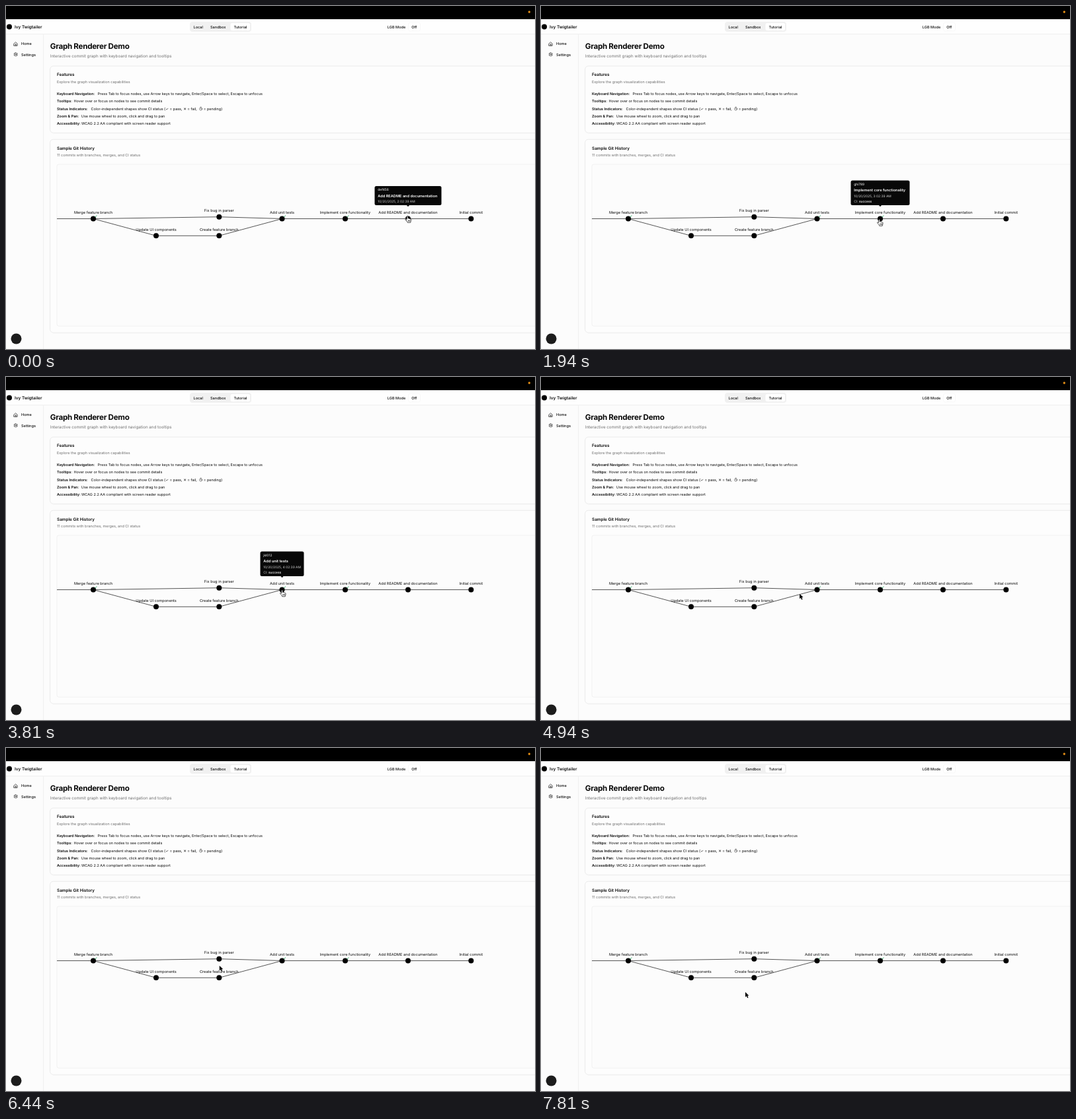
Write an HTML page that moves like this. It is 800 px wide and 520 px high and loops after 8000 ms.

```html
<!DOCTYPE html>
<html lang="en">
<head>
<meta charset="utf-8">
<title>Commit graph demo</title>
<style>
  html, body { margin: 0; width: 100%; height: 100%; overflow: hidden; background: #fcfcfc; }
  svg { display: block; width: 800px; height: 520px; }
  text { font-family: Inter, "DejaVu Sans", sans-serif; font-size: 5.5px; fill: #0a0a0a; text-rendering: geometricPrecision; white-space: pre; }
  .muted { fill: #6f6f6f; }
  .med { font-weight: 500; font-size: 5.58px; }
  .semi { font-weight: 600; }
  .label { font-size: 5.68px; text-anchor: middle; }
  .card { fill: #fdfdfd; stroke: #e6e6e6; stroke-width: .8; }
  .icon { fill: none; stroke: #222; stroke-width: .7; stroke-linejoin: round; stroke-linecap: round; }
  #tip text { fill: #fff; font-size: 4.9px; }
  #tip .head { font-size: 5.62px; font-weight: 600; }
  #tip .dim { fill: #d2d2d2; }
</style>
</head>
<body>
<svg viewBox="0 0 800 520">
  <rect width="800" height="520" fill="#fcfcfc"/>
  <rect y="20" width="800" height="22.5" fill="#fefefe"/>
  <rect width="800" height="20"/>
  <circle cx="791.3" cy="9" r="1.7" fill="#e08c16"/>
  <path d="M0 42.6H800M56.6 43V520" stroke="#ebebeb" stroke-width=".8"/>

  <circle cx="5" cy="31.5" r="4"/>
  <rect x="278" y="24" width="93" height="15" rx="4" fill="#f1f1f1"/>
  <rect x="339" y="25.4" width="30.5" height="12.3" rx="3" fill="#fff" stroke="#e6e6e6" stroke-width=".5"/>
  <rect x="608.5" y="25.2" width="18" height="12.8" rx="3" fill="#fff" stroke="#f3f3f3" stroke-width=".6"/>

  <g class="icon">
    <path d="M12 57L14.6 54.7L17.2 57V60.2H12ZM13.8 60.2V57.8H15.4V60.2"/>
    <circle cx="14.7" cy="73.4" r=".9"/>
    <path d="M14.7 70.5L15.6 71.4L17.2 71.9L16.8 73.4L17.2 74.9L15.6 75.4L14.7 76.3L13.8 75.4L12.2 74.9L12.6 73.4L12.2 71.9L13.8 71.4Z"/>
  </g>

  <rect class="card" x="66.6" y="91" width="760" height="101.3" rx="5"/>
  <rect class="card" x="66.6" y="202.2" width="760" height="293" rx="5"/>
  <path d="M71 193H800M71 495.9H800" stroke="#f2f2f2" stroke-width=".8"/>
  <rect x="77" y="240" width="760" height="245.3" rx="3" fill="#fcfcfc" stroke="#ececec" stroke-width=".7"/>

  <g id="copy"></g>
  <g class="icon" stroke="#333" style="stroke-width:.5">
    <circle cx="294.6" cy="156" r="2.1"/>
    <path d="M294.6 154.8V156L295.3 156.5M294 153.1H295.2"/>
  </g>

  <path d="M77 322.5H132L322.3 319.7L417.5 322.5H703.3M132 322.5L227 348.3H322.3L417.5 322.5" fill="none" stroke="#555" stroke-width="1"/>
  <g id="nodes"></g>
  <circle cx="15.5" cy="504.5" r="8" fill="#1c1c1c"/>
  <g id="tip"></g>
  <path id="arrow" d="M0 0V7.7L1.8 6L3.1 9L4.5 8.4L3.2 5.5L5.5 5.4Z" stroke="#fff" stroke-width=".6" paint-order="stroke"/>
  <path id="hand" d="M-.9 .8C-.9 -.3 .9 -.3 .9 .8V3.6C1.3 3 2.4 3.1 2.5 4C3 3.5 4 3.7 4.1 4.5C4.8 4.2 5.5 4.6 5.5 5.4L5.4 7C5.3 8.2 4.8 8.6 4.7 9.8H.2C0 8.6 -1 7.6 -2 6.3C-3 5 -3.2 4.5 -2.6 4.2C-2 3.9 -1.5 4.5 -.9 5.2ZM1.3 6.2V8.2M2.6 6.2V8.2M3.9 6.2V8.2" fill="#fff" stroke="#000" stroke-width=".7" stroke-linejoin="round"/>
</svg>
<script>
const LOOP = 8000;
const $ = id => document.getElementById(id);

function add(parent, tag, attrs, content) {
  const el = document.createElementNS('http://www.w3.org/2000/svg', tag);
  for (const k in attrs) el.setAttribute(k, attrs[k]);
  if (content) el.textContent = content;
  parent.appendChild(el);
  return el;
}

function write(parent, x, y, content, cls = '', style = '') {
  return add(parent, 'text', { x, y, class: cls, style }, content);
}

// Static page text
const copy = $('copy');
write(copy, 13, 33.8, 'Ivy Twigtailer', 'semi', 'font-size:6.4px');
[[283.5, 33.6, 'Local'], [309, 33.6, 'Sandbox'], [344.5, 33.6, 'Tutorial'],
 [576.8, 33.6, 'LGB Mode'], [613.2, 33.6, 'Off'],
 [23, 59.3, 'Home'], [23, 75.5, 'Settings']
].forEach(([x, y, s]) => write(copy, x, y, s, 'med'));
write(copy, 66.7, 65.1, 'Graph Renderer Demo', '', 'font-size:11.65px;font-weight:700;letter-spacing:-.025em');
write(copy, 66.8, 78.3, 'Interactive commit graph with keyboard navigation and tooltips', 'muted', 'font-size:6.2px');
write(copy, 77, 106.2, 'Features', 'semi', 'font-size:6.3px');
write(copy, 77, 116.6, 'Explore the graph visualization capabilities', 'muted');
write(copy, 77, 217.7, 'Sample Git History', 'semi', 'font-size:6.35px');
write(copy, 77, 228.1, '11 commits with branches, merges, and CI status', 'muted');
[['Keyboard Navigation:', 138.6, 'Press Tab to focus nodes, use Arrow keys to navigate, Enter/Space to select, Escape to unfocus'],
 ['Tooltips:', 102.4, 'Hover over or focus on nodes to see commit details'],
 ['Status Indicators:', 128.6, 'Color-independent shapes show CI status (✓ = pass, ✕ = fail,'],
 ['Zoom & Pan:', 113.8, 'Use mouse wheel to zoom, click and drag to pan'],
 ['Accessibility:', 113.9, 'WCAG 2.2 AA compliant with screen reader support']
].forEach(([head, x, body], i) => {
  const y = 134.6 + i * 11.45;
  write(copy, 77, y, head, 'semi');
  write(copy, x, y, body);
});
write(copy, 298.8, 157.5, '= pending)');

// Commit nodes: x, y, label, passed CI
[[132, 322.5, 'Merge feature branch', 1],
 [227, 348.3, 'Update UI components'],
 [322.3, 319.7, 'Fix bug in parser'],
 [322.3, 348.3, 'Create feature branch'],
 [417.5, 322.5, 'Add unit tests', 1],
 [513, 322.5, 'Implement core functionality', 1],
 [608, 322.5, 'Add README and documentation'],
 [703.3, 322.5, 'Initial commit']
].forEach(([x, y, name, passed]) => {
  add($('nodes'), 'circle', { cx: x, cy: y, r: 4 });
  if (passed) add($('nodes'), 'path', {
    d: `M${x + 2.2} ${y - 3.6}l1 1.1l2.1 -2.8`, fill: 'none', stroke: '#2fa866', 'stroke-width': .8
  });
  write($('nodes'), x, y - 7.5, name, 'label');
});

// Tooltips: visible from, until, node x, node y, box width, hash, title, hour, CI
const tips = [
  [0, 1190, 608, 322.5, 101, 'def456', 'Add README and documentation', 2],
  [1570, 3250, 513, 322.5, 89, 'ghi789', 'Implement core functionality', 3, 'success'],
  [3750, 4750, 417.5, 322.5, 66, 'jkl012', 'Add unit tests', 4, 'success'],
  [5380, 6250, 322.3, 319.7, 66, 'stu901', 'Fix bug in parser', 7],
  [6750, 7560, 322.3, 348.3, 71, 'mno345', 'Create feature branch', 5]
].map(([from, until, x, y, w, hash, title, hour, ci]) => {
  const g = add($('tip'), 'g', {});
  const h = ci ? 37.5 : 29;
  const left = x - w / 2, top = y - 20.5 - h, tx = left + 4.8;
  add(g, 'rect', { x: left, y: top, width: w, height: h, rx: 2.5, fill: '#080808' });
  add(g, 'path', { d: `M${x - 2.2} ${top + h - .2}h4.4l-2.2 2.4Z`, fill: '#080808' });
  write(g, tx, top + 7.4, hash);
  write(g, tx, top + 16.7, title, 'head');
  write(g, tx, top + 25.1, `10/20/2025, ${hour}:02:39 AM`, 'dim');
  if (ci) {
    write(g, tx, top + 33.4, 'CI:', 'dim');
    write(g, tx + 7.6, top + 33.4, ci, '', 'font-weight:500');
  }
  return { from, until, g };
});

// Pointer moves: start, end, then a quadratic path
const moves = [
  [1130, 1600, [603, 326], [557, 373], [511.5, 323.5]],
  [3190, 3780, [511.5, 323.5], [464, 371], [417.5, 323]],
  [4690, 5400, [417.5, 323], [372, 338], [322, 317]],
  [6190, 6780, [322, 317], [323.5, 333.5], [322.5, 350.5]],
  [7500, 7810, [322.5, 350.5], [319, 362], [309, 370]]
];

function pointer(t) {
  let state = { x: 607, y: 318.5, hand: true };
  moves.forEach(([start, end, a, b, c], i) => {
    if (t < start) return;
    const u = Math.min(1, (t - start) / (end - start));
    const s = u * u * (3 - 2 * u);
    const at = k => (1 - s) ** 2 * a[k] + 2 * s * (1 - s) * b[k] + s * s * c[k];
    state = { x: at(0), y: at(1), hand: u === 1 && i < moves.length - 1 };
  });
  return state;
}

function show(el, on) {
  el.setAttribute('visibility', on ? 'visible' : 'hidden');
}

function draw(t) {
  tips.forEach(({ from, until, g }) => show(g, t >= from && t < until));
  const { x, y, hand } = pointer(t);
  show($('hand'), hand);
  show($('arrow'), !hand);
  $(hand ? 'hand' : 'arrow').setAttribute('transform', `translate(${x} ${y})`);
}

const start = performance.now();
function tick() {
  draw((performance.now() - start) % LOOP);
  requestAnimationFrame(tick);
}
tick();
</script>
</body>
</html>
```
